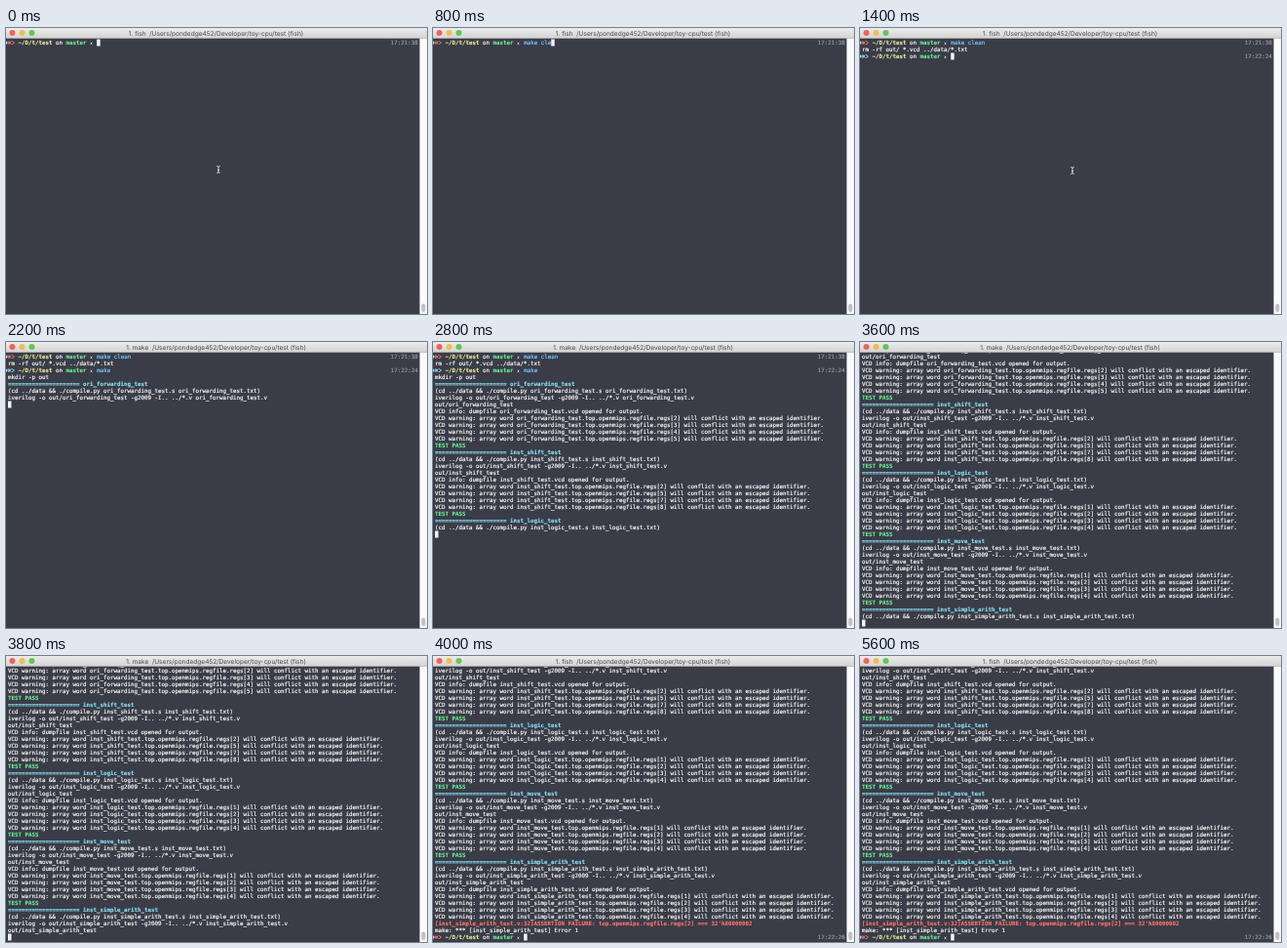
Animation, 432 px wide and 293 px high, one loop 5.8 s. Source, as an HTML page:

```html
<!DOCTYPE html>
<html lang="en">
<head>
<meta charset="utf-8">
<title>Terminal test run</title>
<style>
html, body { margin: 0; width: 100%; height: 100%; overflow: hidden; background: #3a3c48; }
svg { display: block; width: 432px; height: 293px; }
text { white-space: pre; text-rendering: geometricPrecision; }
#screen text {
  font: 5.825px "DejaVu Sans Mono", monospace;
  color: #f8f8f4; fill: currentColor; stroke: currentColor; stroke-width: .2px;
}
#screen .bold { font-weight: bold; stroke-width: .1px; }
#title { font: 6.55px Inter, sans-serif; fill: #4b4b4b; text-anchor: middle; }
</style>
</head>
<body>
<svg viewBox="0 0 432 293">
  <defs>
    <linearGradient id="bar" x2="0" y2="1">
      <stop stop-color="#ececec"/><stop offset="1" stop-color="#d3d3d3"/>
    </linearGradient>
    <clipPath id="pane"><rect y="11" width="424.5" height="282"/></clipPath>
  </defs>
  <rect width="432" height="293" fill="#3a3c48"/>
  <g id="screen" clip-path="url(#pane)">
    <g id="lines"></g>
    <rect id="caret" width="3.5" height="7" fill="#f2f2f2"/>
  </g>
  <path id="pointer" d="M216.3 141.5q1.7 0 1.7 1.2v4.6q0 1.2-1.7 1.2M219.7 141.5q-1.7 0-1.7 1.2M218 147.3q0 1.2 1.7 1.2M217 145.6h2" fill="none" stroke="#e4e4e6" stroke-width=".9"/>
  <rect x="424.5" y="10" width="7.5" height="283" fill="#fafafa"/>
  <rect x="426.3" y="282.5" width="4" height="8.5" rx="2" fill="#c1c1c1"/>
  <rect width="432" height="10.6" fill="url(#bar)"/>
  <rect y="10.2" width="432" height=".5" fill="#a9a9ab"/>
  <circle cx="6.5" cy="5" r="3" fill="#f0635a"/>
  <circle cx="16.5" cy="5" r="3" fill="#f2bd4e"/>
  <circle cx="26.5" cy="5" r="3" fill="#62c655"/>
  <text id="title" x="215.5" y="7.5"></text>
</svg>
<script>
const LOOP = 5800, CELL = 3.507, ROW = 7, LEFT = 2, TOP = 11.5, ROWS = 40, PROMPT_COLS = 26;
const CYAN = '#8be5fa', GREEN = '#6cf093', YELLOW = '#f2f594', RED = '#ff7468', BLUE = '#72c3f3';
const $ = id => document.getElementById(id);

function add(parent, tag, attrs, content = '') {
  const node = document.createElementNS('http://www.w3.org/2000/svg', tag);
  for (const key in attrs) node.setAttribute(key, attrs[key]);
  node.textContent = content;
  return parent.appendChild(node);
}

const lines = [];

function newLine() {
  const y = TOP + lines.length * ROW;
  const line = { group: add($('lines'), 'g', { transform: `translate(${LEFT} ${y})` }) };
  lines.push(line);
  return line;
}

function write(line, col, content, color, bold) {
  const attrs = { x: col * CELL, y: 5.5 };
  if (color) attrs.style = `color:${color}`;
  if (bold) attrs.class = 'bold';
  return add(line.group, 'text', attrs, content);
}

const print = (content, color, bold) => write(newLine(), 0, content, color, bold);

function prompt(command, clock, failed) {
  const line = newLine(), tone = failed ? RED : CYAN;
  add(line.group, 'path', { d: 'M-2 1.8l2 1.8-2 1.8z', fill: '#b5d5f2' });
  add(line.group, 'path', {
    d: 'M.8 2v3.2l2.5-3.2M.8 2l2.5 3.2M4 1.9l2.5 1.7L4 5.3',
    fill: 'none', stroke: tone, 'stroke-width': .9
  });
  write(line, 3, '~/D/t/test', YELLOW, true);
  write(line, 14, 'on');
  write(line, 17, 'master', GREEN, true);
  add(line.group, 'path', { d: 'M84.7 3.6l1.6 1.6m0-1.6l-1.6 1.6', stroke: '#f2f2ee', 'stroke-width': 1 });
  write(line, 112, clock, '#9698a0');
  line.command = command;
  line.input = write(line, PROMPT_COLS, '', BLUE);
}

function runTest(name, registers) {
  print('='.repeat(21) + ' ' + name, CYAN, true);
  print(`(cd ../data && ./compile.py ${name}.s ${name}.txt)`);
  print(`iverilog -o out/${name} -g2009 -I.. ../*.v ${name}.v`);
  print(`out/${name}`);
  print(`VCD info: dumpfile ${name}.vcd opened for output.`);
  for (const r of registers)
    print(`VCD warning: array word ${name}.top.openmips.regfile.regs[${r}] will conflict with an escaped identifier.`);
}

function passTest(name, registers) {
  runTest(name, registers);
  print('TEST PASS', GREEN, true);
}

prompt('make clean', '17:21:38', true);
print('rm -rf out/ *.vcd ../data/*.txt');
prompt('make', '17:22:24', false);
print('mkdir -p out');
passTest('ori_forwarding_test', [2, 3, 4, 5]);
passTest('inst_shift_test', [2, 5, 7, 8]);
passTest('inst_logic_test', [1, 2, 3, 4]);
passTest('inst_move_test', [1, 2, 3, 4]);
runTest('inst_simple_arith_test', [1, 2, 3, 4]);
print("[inst_simple_arith_test.v:32]ASSERTION FAILURE: top.openmips.regfile.regs[2] === 32'h80000002", RED, true);
print('make: *** [inst_simple_arith_test] Error 1');
prompt('', '17:22:26', true);

// Finished lines at each 200 ms tick; the caret sits on the next one.
const TICK = 200;
const finished = [0, 0, 0, 0, 0, 0, 1, 2, 2, 2, 6, 7, 16, 17, 26, 28, 36, 38, 46, 48, 55];

function typedAt(row, time) {
  const start = row === 0 ? 0 : 1400;
  return Math.floor((time - start) / TICK) * 2;
}

function draw(time) {
  const done = finished[Math.min(Math.floor(time / TICK), finished.length - 1)];
  const scroll = Math.max(0, done - ROWS + 1);
  let caretCol = 0;
  lines.forEach((line, i) => {
    const active = i === done && line.input;
    line.group.style.display = i < done || active ? '' : 'none';
    if (!line.input) return;
    line.input.textContent = active ? line.command.slice(0, typedAt(i, time)) : line.command;
    if (active) caretCol = PROMPT_COLS + line.input.textContent.length;
  });
  $('lines').setAttribute('transform', `translate(0 ${-scroll * ROW})`);
  $('caret').setAttribute('x', LEFT + caretCol * CELL);
  $('caret').setAttribute('y', TOP + (done - scroll) * ROW);

  const moved = time >= 1400 && time < 1600;
  $('pointer').style.display = time < 200 || moved ? '' : 'none';
  $('pointer').setAttribute('transform', `translate(0 ${moved ? 1 : 0})`);

  const job = time >= 2000 && time < 4000 ? 'make' : 'fish';
  $('title').textContent = `1. ${job}  /Users/pondedge452/Developer/toy-cpu/test (fish)`;
}

const origin = performance.now();
function frame() {
  draw((performance.now() - origin) % LOOP);
  requestAnimationFrame(frame);
}
frame();
</script>
</body>
</html>
```
